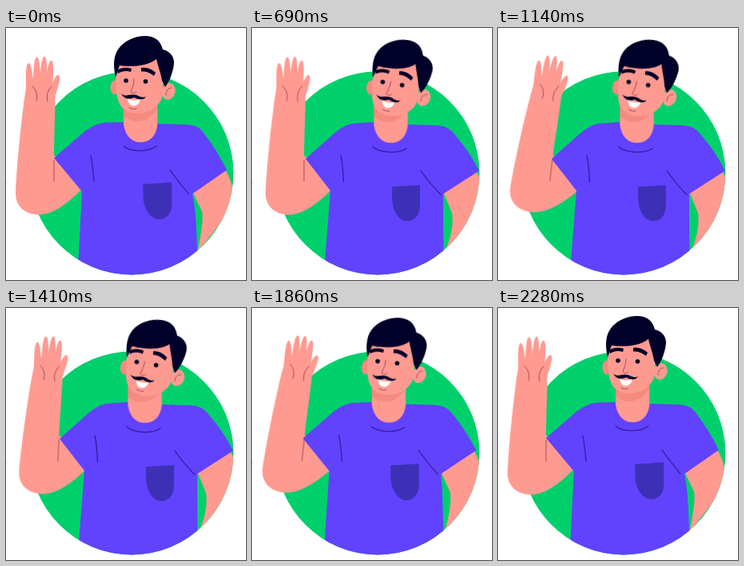
An HTML page for the animation above (2310 ms loop, 300 px wide and 316 px high).

```html
<!DOCTYPE html>
<html lang="en">
<head>
<meta charset="utf-8">
<title>Waving man</title>
<style>
  html, body { margin: 0; width: 100%; height: 100%; overflow: hidden; background: #fff; }
  svg { display: block; width: 300px; height: 316px; }

  .skin { fill: #ff9a91; }
  .shade { fill: #f58b7e; }
  .dark { fill: #010028; }
  .shirt { fill: #6142ff; }
  .pocket { fill: #3e30b6; }
  .line { fill: none; stroke: #2c1f92; stroke-width: 1.2; stroke-linecap: round; }
  .crease { fill: none; stroke: #a04c5c; stroke-width: 1; stroke-linecap: round; }

  /* a: upright pose, b: leaning pose */
  .morph, .head, .neck, .arm { animation: 2310ms infinite cubic-bezier(.42, 0, .58, 1); }
  .morph { d: var(--a); animation-name: morph; }
  .head { transform-origin: 168px 130px; animation-name: head; }
  .neck { animation-name: neck; }
  .arm { animation-name: arm; }
  .wave { transform-origin: 66px 190px; animation: wave 2310ms infinite cubic-bezier(.42, 0, .58, 1); }

  @keyframes morph { 0%, 100% { d: var(--a); } 19.5%, 62.3% { d: var(--b); } }
  @keyframes head {
    0%, 100% { transform: translate(0, 0) rotate(0deg); }
    19.5%, 62.3% { transform: translate(5.5px, 3.4px) rotate(7deg); }
  }
  @keyframes neck { 0%, 100% { transform: translate(0, 0); } 19.5%, 62.3% { transform: translate(5.4px, .8px); } }
  @keyframes arm { 0%, 100% { transform: translate(0, 0); } 19.5%, 62.3% { transform: translate(5px, .2px); } }
  @keyframes wave {
    0%, 32%, 69.3%, 100% { transform: rotate(0deg); }
    16%, 48.9%, 84.8% { transform: rotate(7deg); }
  }

  #rightArm {
    --a: path("M273 176C288 200 286 218 272 238C262 254 250 268 240 279C243 262 247 242 245 230L233 205Z");
    --b: path("M279 178C294 200 290 222 278 238C268 254 256 266 243 276C249 262 252 244 250 232L239 205Z");
  }
  #shirt {
    --a: path("M60 163L98 130C107 124 114 119 126 118.5L147 118L189 120L222 121C235 121 241 124 246 130C257 144 267 160 276 178L233 208C236 222 239 240 240 320L89 320L95 205Z");
    --b: path("M67 164L104 131C113 124 120 120 130 119.5L152 118L194 121L228 122C241 122 247 126 252 132C264 146 275 161 284 179L239 208C239 222 239 240 240 320L89 320L98 204Z");
  }
  #pocket {
    --a: path("M171 196L207 193.5L207.5 220C207 234 200 240 191 240C181 239 172 228 171.5 212Z");
    --b: path("M175 199L210 197L210 222C210 236 202 243 193 242C183 241 176 230 175 214Z");
  }
  #foldL {
    --a: path("M106 160C108 170 109 180 110 192");
    --b: path("M111 160C113.5 170 114 181 114.5 193");
  }
  #foldR {
    --a: path("M205 178C212 188 220 198 228 208");
    --b: path("M211 179C218 189 227 200 236 209");
  }
  #collar {
    --a: path("M147 148C155 155.5 178 156 188 148");
    --b: path("M151 149C160 157 183 158 193 151");
  }
</style>
</head>
<body>
<svg viewBox="0 0 300 316">
  <defs>
    <clipPath id="disc"><circle cx="157" cy="182" r="127.4"/></clipPath>
    <path id="finger" class="skin" d="M-4.6 2C-4.6 -14 -4 -34 0 -34C4 -34 4.6 -14 4.6 2Z"/>
  </defs>
  <circle cx="157" cy="182" r="127.4" fill="#00d06c"/>
  <path d="M0 192L3 198" stroke="#ececf0" fill="none"/>

  <g class="arm">
    <g class="wave">
      <path class="skin" d="M12 207C13 180 18 125 23 88L25.5 72L30 62H54L61.5 80C61.5 110 60 140 60 160L110 185L96 201C84 213 62 234 42 234C24 234 12 224 12 207Z"/>
      <use href="#finger" transform="translate(30 78) rotate(-3)"/>
      <use href="#finger" transform="translate(38.5 74) scale(1 1.1)"/>
      <use href="#finger" transform="translate(46 74) rotate(3) scale(1 1.12)"/>
      <use href="#finger" transform="translate(53 76) rotate(6) scale(1 1.04)"/>
      <use href="#finger" transform="translate(57 84) rotate(19) scale(1 .78)"/>
      <path class="crease" d="M33 73C38 78 40 84 38 91M57 73C52 78 50 85 52 92M60 166V192"/>
    </g>
  </g>

  <g clip-path="url(#disc)">
    <path id="rightArm" class="morph skin"/>
    <path id="shirt" class="morph shirt"/>
    <path id="pocket" class="morph pocket"/>
    <path id="foldL" class="morph line"/>
    <path id="foldR" class="morph line"/>
    <path id="collar" class="morph line"/>
  </g>

  <g class="neck">
    <path class="skin" d="M147 90V121C149 136 158 143.3 168 143.3C179 143.3 188 136 189.3 121V90Z"/>
    <path class="shade" d="M147 111C160 121 179 119 189 101V90H147Z"/>
  </g>

  <g class="head">
    <ellipse class="shade" cx="136" cy="74.5" rx="5.5" ry="9"/>
    <ellipse class="skin" cx="203" cy="79.5" rx="8.5" ry="10.5" transform="rotate(15 203 79.5)"/>
    <path class="skin" d="M137 48C137 65 137 80 140 90C143 101 152 107 162 107C176 108 190 100 195 88L198 40H140Z"/>
    <path class="crease" d="M207 75C202 75 200 79 200 84M160 64C160 71 157 77 156 80C158 82 161 82 163 80M154 100C157 102 160 102 163 101"/>
    <path class="dark" d="M137 62C134 48 134 36 140 27C147 16 161 10 174 10C185 10 193 15 196 27C206 29 212 38 209.5 48C208 58 203 69 199 74L195 66C194 58 190 48 188 39C176 48 158 49 142 47C140 52 139 57 137 62Z"/>
    <path class="dark" d="M139 53C145 49 151 49 157 51L156 55C150 53 145 54 140 57ZM169 50C176 49 183 52 187 56L185 60C180 56 175 54 169 54.5Z"/>
    <circle class="dark" cx="150" cy="66" r="2.8"/>
    <circle class="dark" cx="174.5" cy="67" r="2.8"/>
    <path fill="#fff" d="M152 89C158 91 164 91 168 89C167 95 163 98 159 97.5C155 97 153 94 152 89Z"/>
    <path class="dark" d="M144 82C148 87 154 83 159 83.5C165 83 168 89 175 86C171 92 164 89 160 87C154 90 147 89 144 82Z"/>
  </g>
</svg>
</body>
</html>
```
